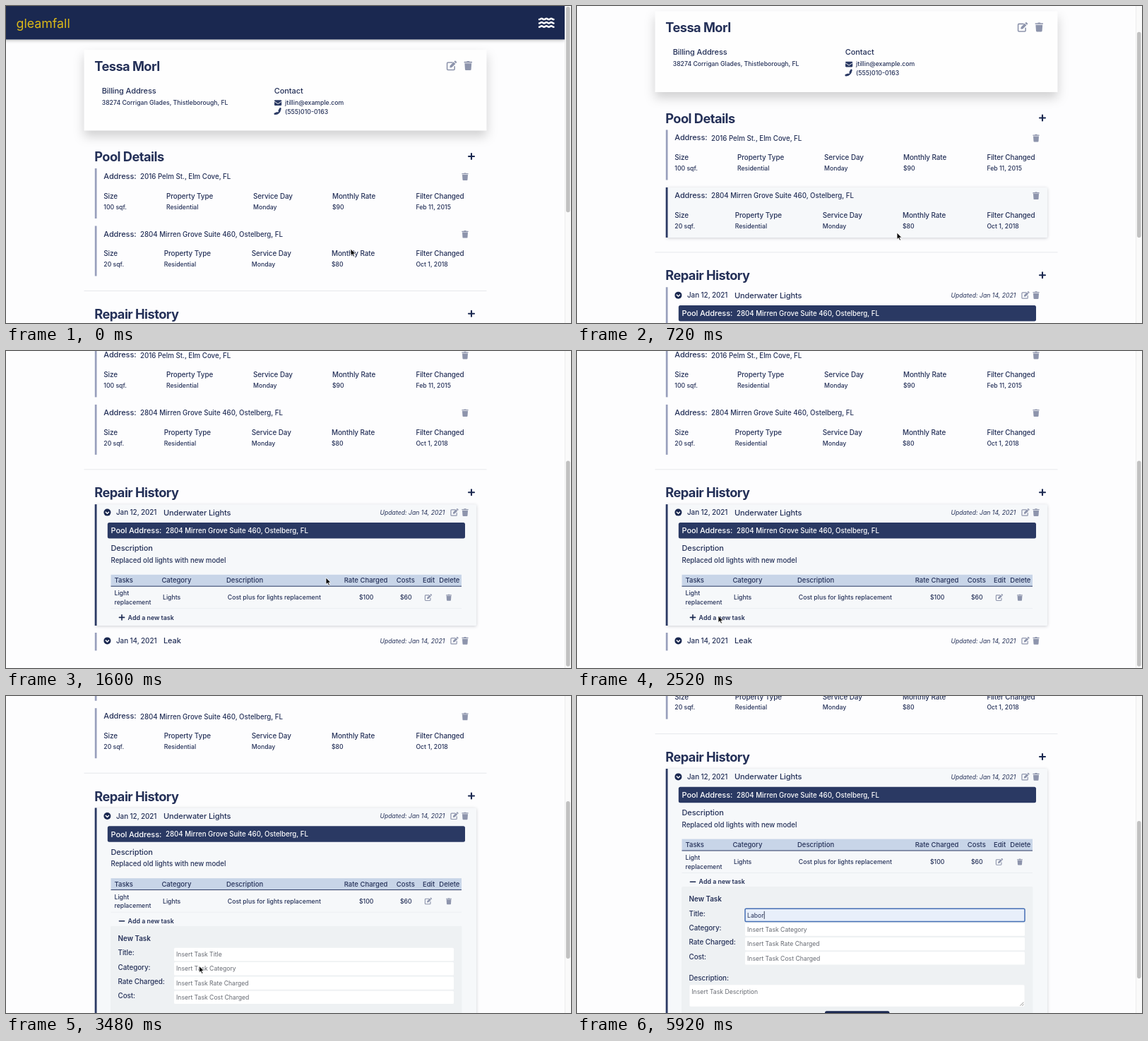
These frames come from a looping animation (800 by 449 pixels, 6280 ms). An HTML page:

```html
<!DOCTYPE html>
<html lang="en">
<head>
<meta charset="utf-8">
<title>Pool service record</title>
<style>
  html, body { margin: 0; width: 100%; height: 100%; overflow: hidden; background: #fdfdfe; }
  svg { display: block; }
  #stage { width: 100vw; height: 100vh; }
  text { font-family: Inter, "Open Sans", sans-serif; fill: #243058; white-space: pre; }
  .card { filter: drop-shadow(0 8px 7.5px rgba(0, 0, 0, .18)); }
  .lift { filter: drop-shadow(0 1.5px 2px rgba(30, 40, 60, .22)); }
  .bar { filter: drop-shadow(0 1px 2.5px rgba(0, 0, 0, .3)); }
</style>
</head>
<body>
<svg id="stage" viewBox="0 0 800 449" preserveAspectRatio="none" xmlns="http://www.w3.org/2000/svg"></svg>
<script>
const LOOP = 6280;
const NAVY = '#1a2850', INK = '#2a3963', PALE = '#989fbc', ICON = '#8d94ac';
const FORM_TOP = 619.8, FORM_GROWTH = 207, PAGE = 685, VIEW = 449;

// Text styles: size, weight, tracking in em
const H1 = [18.2, 700, -.028], H2 = [11, 550, -.009], H3 = [9.9, 550, -.007], TH = [9.5, 500, 0],
      BODY = [9.7, 450, 0], SMALL = [8.7, 450, 0], LINK = [8.85, 600, 0], HINT = [8.65, 400, 0];

// y is the middle of the capital letters
const text = (x, y, [size, weight, tracking], str, extra = '') =>
  `<text x="${x}" y="${(y + size * .364).toFixed(2)}" font-size="${size}" font-weight="${weight}" ` +
  `letter-spacing="${(size * tracking).toFixed(3)}" ${extra}>${str}</text>`;
const rect = (x, y, w, h, fill, extra = '') =>
  `<rect x="${x}" y="${y}" width="${w}" height="${h}" fill="${fill}" ${extra}/>`;
const line = (d, color, width, extra = '') =>
  `<path d="${d}" fill="none" stroke="${color}" stroke-width="${width}" ${extra}/>`;
const at = (x, y, scale, body) => `<g transform="translate(${x} ${y}) scale(${scale})">${body}</g>`;

const plus = (x, y) => line(`M${x - 4} ${y}h8M${x} ${y - 4}v8`, NAVY, 2.1, 'stroke-linecap="round"');

// Icons are centred on x, y
const trash = (x, y, h) => at(x, y, h / 13,
  `<path fill="${ICON}" d="M-5.2-5.7h3l.7-.8h3l.7.8h3q.5 0 .5.5v1.1h-11.4v-1.1q0-.5.5-.5zM-4.9-3.3h9.8l-.6 8.7q-.1 1.1-1.2 1.1h-6.2q-1.1 0-1.2-1.1z"/>`);
const edit = (x, y, w) => at(x, y, w / 14,
  line('M1-4.6h-6q-1.2 0-1.2 1.2v7.8q0 1.2 1.2 1.2h7.8q1.2 0 1.2-1.2v-3.4', ICON, 1.5, 'stroke-linecap="round"') +
  `<path fill="${ICON}" d="M-2.6 2.6l.3-2.8 5-5 2.5 2.5-5 5zM3.3-5.8l.9-.9q.6-.5 1.2 0l1.3 1.3q.5.6 0 1.2l-.9.9z"/>`);
const chevron = y => `<circle cx="143.4" cy="${y}" r="5" fill="${NAVY}"/>` +
  line(`M140.9 ${y - .9}l2.5 2.5 2.5-2.5`, '#fff', 1.5);

const hover = (id, y, h) => `<g id="${id}" opacity="0">` +
  rect(127, y, 539, h, '#f6f8fa', `class="lift" rx="1.5"`) + rect(125.8, y, 2.7, h, INK) + '</g>';

const waves = [18.4, 23.7, 29].map(y =>
  line(`M755 ${y + .7}c1.8 0 1.8-1.4 3.4-1.4` + 's1.8 1.4 3.4 1.4 1.8-1.4 3.4-1.4'.repeat(2) + 's1.8 1.4 3.4 1.4',
    '#fff', 2.5, 'stroke-linecap="round"')).join('');

const HOME = '2804 Mirren Grove Suite 460, Ostelberg, FL';

const header = `<g class="bar">${rect(-10, -10, 801, 57.4, NAVY)}</g>` +
  text(14.5, 24.2, [17.8, 400, 0], 'gleamfall', 'style="fill:#dcb918"') + waves;

const customer = rect(110.5, 62, 570, 114.5, '#fefefe', 'class="card"') +
  text(125.2, 85, H1, 'Tessa Morl') + edit(631, 84.7, 14.5) + trash(654.3, 84.5, 13) +
  text(135.7, 120, H2, 'Billing Address') +
  text(135.7, 136.8, SMALL, '38274 Corrigan Glades, Thistleborough, FL') +
  text(379.8, 120, H2, 'Contact') +
  rect(380, 133.2, 10.2, 7.8, INK, 'rx="1.1"') + line('M380 135.2l5.1 3.4 5.1-3.4', '#fff', .9) +
  text(395, 136.8, SMALL, 'jtillin@example.com') +
  line('M381.3 153.1q5.9-.6 7.2-6.9', INK, 1.9) +
  line('M380.7 152.6l3.1-1.2M386.7 148.4l1.7-3', INK, 2.6, 'stroke-linecap="round"') +
  text(395, 149.7, SMALL, '(555)010-0163');

const LABELS = ['Size', 'Property Type', 'Service Day', 'Monthly Rate', 'Filter Changed'];
const pool = (y, address, xs, values) =>
  text(138.3, y + 11, H2, 'Address:') + text(190, y + 11.9, BODY, address) + trash(650, y + 11.7, 10.6) +
  LABELS.map((s, i) => text(xs[i], y + 39.2, H3, s) + text(xs[i], y + 54.4, SMALL, values[i])).join('');

const pools = text(125.2, 213.5, H1, 'Pool Details') + plus(659, 213) +
  rect(125.8, 230, 2.7, 71, PALE) + rect(125.8, 311.5, 2.7, 71, PALE) + hover('poolHover', 311.5, 71) +
  pool(230, '2016 Pelm St., Elm Cove, FL', [138.3, 227, 350, 462, 580.4],
    ['100 sqf.', 'Residential', 'Monday', '$90', 'Feb 11, 2015']) +
  pool(311.6, HOME, [138.3, 223.7, 347.8, 461, 580.4],
    ['20 sqf.', 'Residential', 'Monday', '$80', 'Oct 1, 2018']) +
  rect(110.5, 403, 570, .9, '#e4e6ea');

const repair = (y, date, title) => chevron(y) + text(156, y, H3, date) + text(223, y, H2, title) +
  text(529.5, y, SMALL, 'Updated: Jan 14, 2021', 'font-style="italic"') + edit(635, y, 11.4) + trash(650, y, 10.6);

const table = rect(148.5, 552.4, 496.5, 16.3, '#c8d5e8') + rect(148.5, 568.3, 496.5, 1, INK) +
  [[153.5, 'Tasks'], [220.4, 'Category'], [312, 'Description'], [478.7, 'Rate Charged'],
   [552.8, 'Costs'], [590, 'Edit'], [613.3, 'Delete']].map(([x, s]) => text(x, 560.4, TH, s)).join('') +
  text(153.5, 578.8, SMALL, 'Light') + text(153.5, 591.2, SMALL, 'replacement') +
  [[222, 'Lights'], [313.8, 'Cost plus for lights replacement'], [500, '$100'], [558, '$60']]
    .map(([x, s]) => text(x, 584.9, SMALL, s)).join('') +
  edit(598, 584.9, 10.4) + trash(627, 584.9, 9) + rect(148.5, 600, 496.5, .7, '#e6e9ee');

const hint = 'style="fill:#666a72"';
const field = (i, label, prompt) => {
  const y = 651 + i * 20.35;
  return text(158.5, y + 7, H3, label) +
    (i ? rect(238, y, 396, 18.3, '#fff', 'rx="1.5"') : '<rect id="box" x="238" y="651" width="396" height="18.4" rx="1.5"/>') +
    text(241, y + 9.2, HINT, prompt, hint + (i ? '' : ' id="prompt"'));
};
const form = rect(148, 619.8, 497.5, 204, '#eef1f3', 'rx="2"') + text(158.5, 637.3, [9.85, 600, 0], 'New Task') +
  field(0, 'Title:', 'Insert Task Title') + field(1, 'Category:', 'Insert Task Category') +
  field(2, 'Rate Charged:', 'Insert Task Rate Charged') + field(3, 'Cost:', 'Insert Task Cost Charged') +
  text(241, 660.2, HINT, '', 'id="typed"') + rect(0, 654.6, .9, 11, '#222b45', 'id="caret"') +
  text(158.5, 749.5, H3, 'Description:') + rect(159.5, 759, 474, 30.5, '#fff', 'rx="1.5"') +
  text(162.3, 768.6, HINT, 'Insert Task Description', hint) +
  line('M627.5 788.5l5-5M630.3 788.5l2.2-2.2', '#777', .8) +
  rect(351, 796, 91.5, 18, NAVY, 'rx="2.5"');

const repairs = text(125.2, 436.4, H1, 'Repair History') + plus(659, 435.8) +
  rect(125.8, 452.8, 2.7, 171.8, PALE, 'id="repairBar"') + hover('repairHover', 452.8, 171.8) +
  repair(464.2, 'Jan 12, 2021', 'Underwater Lights') +
  rect(143.8, 478.5, 506.2, 22.6, INK, 'rx="2.5"') +
  text(148.5, 489.9, H2, 'Pool Address:', 'style="fill:#fff"') + text(226, 490, BODY, HOME, 'style="fill:#fff"') +
  text(148.5, 515, H2, 'Description') + text(148.5, 531.8, BODY, 'Replaced old lights with new model') + table +
  line('M160.4 613h7.2', NAVY, 1.6, 'stroke-linecap="round"') +
  line('M164 609.4v7.2', NAVY, 1.6, 'stroke-linecap="round" id="stem"') +
  text(172.6, 613, LINK, 'Add a new task') +
  `<svg id="formClip" x="0" y="${FORM_TOP}" width="790" height="0"><g transform="translate(0 ${-FORM_TOP})">${form}</g></svg>` +
  `<g id="next">${rect(125.8, 634.6, 2.7, 25.4, PALE)}${repair(646, 'Jan 14, 2021', 'Leak')}</g>`;

const pointers =
  '<path id="arrow" d="M0 0v9.6l2.2-2 1.6 3.5 1.7-.7-1.6-3.4h3z" fill="#0a0a0a" stroke="#fff" stroke-width=".8"/>' +
  '<g id="beam">' + line('M-2-5q2 0 2 1.3v7.4q0 1.3-2 1.3M2-5q-2 0-2 1.3M0 3.7q0 1.3 2 1.3M-1.2.8h2.4', '#111', 1) + '</g>';

document.getElementById('stage').innerHTML =
  rect(0, 0, 800, 449, '#fdfdfe') + `<g id="page">${customer + header + pools + repairs}</g>` +
  rect(791, 0, 9, 449, '#fafafa') + rect(791, 0, .7, 449, '#e6e6e6') +
  rect(793, 0, 5.6, 0, '#c1c1c1', 'rx="2.8" id="thumb"') + `<g id="pointer">${pointers}</g>`;

const el = id => document.getElementById(id);
const set = (id, attrs) => { for (const k in attrs) el(id).setAttribute(k, attrs[k]); };
const show = (id, on) => set(id, { visibility: on ? 'visible' : 'hidden' });

const ramp = (t, a, b) => Math.min(1, Math.max(0, (t - a) / (b - a)));
const smooth = u => u * u * (3 - 2 * u);
const easeOut = u => 1 - (1 - u) ** 2;

// Keys: time, value, easing into that key
function track(keys, t) {
  let value = keys[0][1];
  for (let i = 1; i < keys.length; i++) {
    const [t0, v0] = keys[i - 1], [t1, v1, ease] = keys[i];
    if (t < t0) break;
    const u = ramp(t, t0, t1);
    value = v0 + (v1 - v0) * (ease ? ease(u) : u);
  }
  return value;
}

const SCROLL = [[240, 0], [400, 21.6], [640, 45, easeOut], [1080, 152, smooth], [1240, 152], [1320, 165.2],
  [1560, 235.6, easeOut], [3160, 235.6], [3240, 238], [3720, 349.8, smooth]];
const POINTER_X = [[40, 488], [280, 453, smooth], [1860, 453], [2480, 200, smooth], [2760, 200],
  [3120, 273, smooth], [3440, 273], [3720, 281, smooth], [3840, 281], [4160, 291, smooth]];
const POINTER_Y = [[40, 344], [280, 321, smooth], [1860, 321], [2480, 375, smooth], [2760, 375],
  [3120, 385, smooth], [3440, 385], [3720, 338, smooth], [3840, 338], [4160, 309.8, smooth]];
const WORD = 'Labor', KEYS = [4960, 5400, 5640, 5760, 5920];

function draw(t) {
  const scroll = track(SCROLL, t);
  const open = smooth(ramp(t, 2600, 2920));
  const grown = FORM_GROWTH * open;
  const focus = t >= 4240;
  const count = KEYS.filter(k => t >= k).length;

  set('page', { transform: `translate(0 ${-scroll})` });
  const ratio = VIEW / (PAGE + grown);
  set('thumb', { y: 1 + scroll * ratio, height: VIEW * ratio - 3 });

  set('poolHover', { opacity: ramp(t, 40, 200) * (1 - ramp(t, 1400, 1540)) });
  set('repairHover', { opacity: ramp(t, 1400, 1540) });
  for (const r of [el('repairBar'), ...el('repairHover').children]) r.setAttribute('height', 171.8 + grown);
  set('formClip', { height: Math.max(.01, 204 * open) });
  set('next', { transform: `translate(0 ${grown})` });
  show('stem', t < 2600);

  set('box', { fill: focus ? '#e8effa' : '#fff', stroke: focus ? '#456fb5' : 'none', 'stroke-width': 1.5 });
  show('prompt', !count);
  el('typed').textContent = WORD.slice(0, count);
  set('caret', { x: 241 + (count ? el('typed').getComputedTextLength() + .3 : -.3) });
  show('caret', focus && (t < 4640 || count > 0));

  const overField = t >= 4020;
  set('pointer', { transform: `translate(${track(POINTER_X, t)} ${track(POINTER_Y, t)})` });
  show('arrow', !overField);
  show('beam', overField && !count);
}

const start = performance.now();
function tick() {
  draw((performance.now() - start) % LOOP);
  requestAnimationFrame(tick);
}
tick();
</script>
</body>
</html>
```
